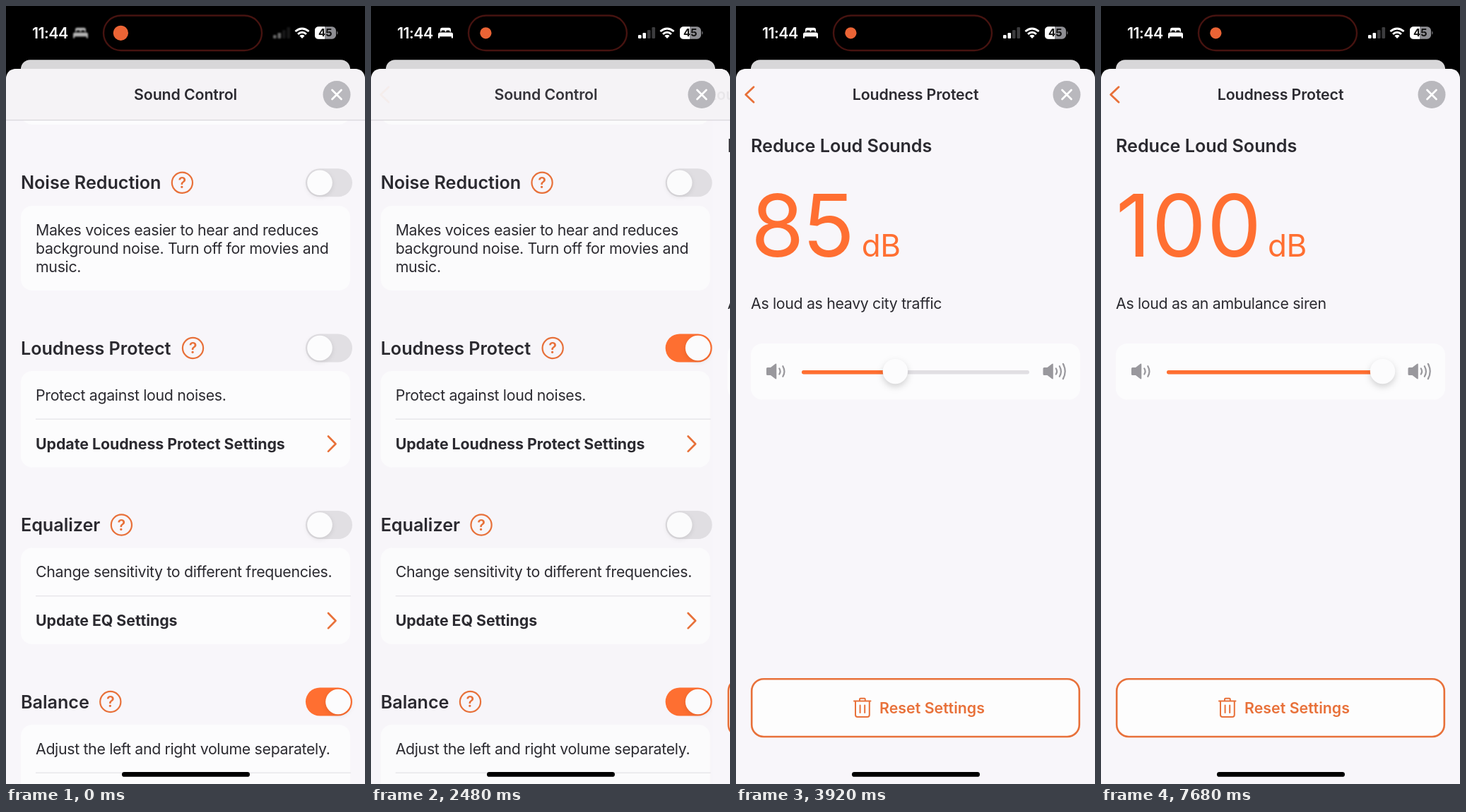
Write an HTML page that moves like this. It is 508 by 1102 pixels and loops after 7.76 s.

```html
<!DOCTYPE html>
<html lang="en">
<head>
<meta charset="utf-8">
<title>Sound Control</title>
<style>
  html, body { margin: 0; width: 100%; height: 100%; overflow: hidden; background: #000; }
  svg { display: block; width: 508px; height: 1102px; }
  text { font: 400 21.33px Inter, "Open Sans", sans-serif; letter-spacing: -.33px; fill: #2b2a30; white-space: pre; }
  .b { font-weight: 600; letter-spacing: -.12px; }
  .link { font-weight: 700; letter-spacing: -.05px; }
  .h { font-size: 25.2px; font-weight: 600; letter-spacing: -.05px; }
  .num { font-size: 122px; letter-spacing: 0; fill: #ff6f31; }
  .unit { font-size: 44px; letter-spacing: -.5px; fill: #ff6f31; }
  .time { font-weight: 600; letter-spacing: -.5px; fill: #fff; }
  .pct { font-size: 15px; font-weight: 700; letter-spacing: 0; fill: #111; }
  .q { font-size: 21.5px; font-weight: 600; letter-spacing: 0; fill: #e8713a; }
  .accent { fill: #e8713a; letter-spacing: .03px; }
  .mid { text-anchor: middle; }
  .line { fill: none; stroke: #e8713a; stroke-linecap: round; stroke-linejoin: round; }
  .card { fill: #fcfcfd; }
  .knob { fill: #fcfcfd; filter: drop-shadow(0 2px 3px rgba(0,0,0,.1)); }
  #thumb { filter: drop-shadow(0 4px 5px rgba(0,0,0,.17)); }
</style>
</head>
<body>
<svg id="stage" viewBox="0 0 508 1102"></svg>
<script>
const ORANGE = '#ff6f31', PAGE = '#f8f6fa';
const LOOP = 7760, STEP = 80, W = 508;

const rect = (x, y, w, h, r, attrs = '') =>
  `<rect x="${x}" y="${y}" width="${w}" height="${h}" rx="${r}" ${attrs}/>`;
const text = (x, y, s, cls = '', attrs = '') =>
  `<text x="${x}" y="${y}" class="${cls}" ${attrs}>${s}</text>`;
const path = (d, attrs) => `<path d="${d}" ${attrs}/>`;
const group = (id, body) => `<g id="${id}">${body}</g>`;

const toggle = (y, id, on) =>
  rect(424, y - 20, 66, 40, 20, `id="${id}Track" fill="${on ? ORANGE : '#e1dfe3'}"`) +
  `<circle id="${id}Knob" class="knob" cx="${on ? 470 : 444}" cy="${y}" r="17.8"/>`;

const section = (y, title, iconX, id, on) =>
  text(21, y + 9, title, 'h') +
  `<circle class="line" cx="${iconX}" cy="${y}" r="14.6" stroke-width="2.2"/>` +
  text(iconX, y + 7.6, '?', 'q mid') + toggle(y, id, on);

const divider = y => rect(42, y, 446, 1.3, 0, 'fill="#e6e5e9"');

const linkCard = (y, info, link) =>
  rect(21, y, 466, 136.5, 16, 'class="card"') + text(42, y + 41.5, info) + divider(y + 67.5) +
  (link ? text(42, y + 110.5, link, 'link') +
    path(`M456 ${y + 92.5}l10.5 10.7l-10.5 10.7`, 'class="line" stroke-width="2.7"') : '');

const speaker = (x, waves) => {
  let s = path(`M${x} 513.5q0-1.5 1.5-1.5h4.5l6.5-5q1.8-1.2 1.8 .8v19.4q0 2-1.8 .8l-6.5-5h-4.5q-1.5 0-1.5-1.5z`, 'fill="#99989d"');
  for (let i = 0; i < waves; i++) {
    const h = 4 + i * 3.3;
    s += path(`M${x + 18.3 + i * 5} ${517.5 - h}q${2.6 + i * 1.6} ${h} 0 ${2 * h}`,
      'fill="none" stroke="#99989d" stroke-width="2.2" stroke-linecap="round"');
  }
  return s;
};

const bars = [5, 8, 12, 16].map((h, i) =>
  rect(378 + i * 6.5, 46 - h, 4.6, h, 1.3, `fill="${i < 2 ? '#fff' : '#3c3c3e'}"`)).join('');

const wifi = [[9.6, 36], [6, 39.8]].map(([w, y]) =>
  path(`M${419 - w} ${y}q${w} ${-w * .82} ${2 * w} 0`, 'fill="none" stroke="#fff" stroke-width="2.9"')).join('') +
  path('M419 46l-3.6-3.8q3.6-2.8 7.2 0z', 'fill="#fff"');

const bed = path('M98 36.5v-3q0-2.8 2.8-2.8h9.4q2.8 0 2.8 2.8v3h-1.6v-1q0-1-1-1h-3q-1 0-1 1v1h-1.8v-1q0-1-1-1h-3q-1 0-1 1v1z' +
  'M97.5 37.5h16q2.5 0 2.5 2.5v5.4h-2.2v-2.2h-16.6v2.2h-2.2v-5.4q0-2.5 2.5-2.5z', 'fill="#fff"');

const status =
  text(37, 45.7, '11:44', 'time') + group('bed', bed) + group('bars', bars) + wifi +
  rect(138, 13.5, 224, 49.5, 24.7, 'fill="#000" stroke="#461310" stroke-width="2.4"') +
  '<circle id="dot" cx="162.4" cy="38.3" fill="#eb6435"/>' +
  rect(437, 29.3, 30, 17.4, 5.5, 'fill="#8e8e93"') +
  path('M451 29.3h-8.5q-5.5 0-5.5 5.5v6.4q0 5.5 5.5 5.5h8.5z', 'fill="#fff"') +
  path('M468.3 35.2q2.4 2.8 0 5.6z', 'fill="#8e8e93"') + text(451.8, 43.4, '45', 'pct mid');

const list =
  rect(21, 120, 466, 48, 16, 'class="card"') +
  section(250.3, 'Noise Reduction', 249.4, 'noise') +
  rect(21, 283, 466, 120, 16, 'class="card"') +
  ['Makes voices easier to hear and reduces', 'background noise. Turn off for movies and', 'music.']
    .map((s, i) => text(42, 325 + i * 26.2, s)).join('') +
  section(484.5, 'Loudness Protect', 264.5, 'loud') +
  linkCard(517, 'Protect against loud noises.', 'Update Loudness Protect Settings') +
  section(735, 'Equalizer', 163.4, 'eq') +
  linkCard(767.5, 'Change sensitivity to different frequencies.', 'Update EQ Settings') +
  section(985.5, 'Balance', 147.8, 'bal', true) +
  linkCard(1018, 'Adjust the left and right volume separately.');

const trash = path('M167 984.5h23.5M175 984v-2q0-1.3 1.3-1.3h5.2q1.3 0 1.3 1.3v2' +
  'M169 985v19q0 3 3 3h13.8q3 0 3-3v-19M175.6 990.5v10.5M182.2 990.5v10.5', 'class="line" stroke-width="2"');

const detail =
  rect(0, 89, W, 1013, 0, `fill="${PAGE}"`) +
  text(21, 207, 'Reduce Loud Sounds', 'h') +
  text(21, 355, '', 'num', 'id="num"') + text(0, 355, 'dB', 'unit', 'id="unit"') +
  text(21, 429, '', '', 'id="note"') +
  rect(21, 478, 466, 79.5, 16, 'class="card"') + speaker(43, 2) + speaker(434.5, 3) +
  rect(93, 516.1, 322, 5.4, 2.7, 'fill="#e1dfe3"') +
  rect(93, 516.1, 0, 5.4, 2.7, `id="fill" fill="${ORANGE}"`) +
  '<circle id="thumb" class="knob" cy="517.6" r="17.7"/>' +
  rect(22.2, 953.2, 463.6, 81.8, 17, 'fill="#fdfdfd" stroke="#e8713a" stroke-width="2.6"') +
  trash + text(203, 1002.4, 'Reset Settings', 'b accent');

const $ = id => document.getElementById(id);
const set = (id, attrs) => { for (const k in attrs) $(id).setAttribute(k, attrs[k]); };

$('stage').innerHTML =
  `<clipPath id="sheet"><path d="M0 1102V105q0-16 16-16H492q16 0 16 16V1102z"/></clipPath>` +
  rect(0, 0, W, 1102, 0, 'fill="#000"') + status +
  rect(21, 76.2, 466, 60, 13, 'fill="#d8d7d9"') +
  `<g clip-path="url(#sheet)">` +
    rect(0, 89, W, 1013, 0, `fill="${PAGE}"`) + group('list', list) +
    rect(0, 89, W, 1013, 0, 'id="shade"') + group('detail', detail) +
    group('bar', rect(0, 89, W, 72.5, 0, 'fill="#f5f3f6"') + rect(0, 161, W, 1.3, 0, 'fill="#d9d8dc"')) +
    text(254, 133.2, 'Sound Control', 'b mid', 'id="oldTitle"') +
    text(254, 133.2, 'Loudness Protect', 'b mid', 'id="newTitle"') +
    path('M25 114.7l-11.3 10.8l11.3 10.8', 'id="back" class="line" stroke-width="2.8"') +
    '<circle cx="468" cy="125.5" r="19.5" fill="#b9b8bd"/>' +
    path('M461.5 119l13 13m0-13l-13 13', 'stroke="#fff" stroke-width="2.7" stroke-linecap="round"') +
  '</g>' + rect(164, 1085, 181, 6.8, 3.4, 'fill="#000"');

// start time, level, dB label x, caption
const levels = [
  [0, 80, 179.5, 'a noisy restaurant'],
  [3920, 85, 177.7, 'heavy city traffic'],
  [4560, 90, 179.5, 'a motorcycle'],
  [5120, 95, 177.7, 'a car horn'],
  [5760, 100, 236, 'an ambulance siren']
];

// critically damped spring from 0 to 1
const spring = ms => {
  const x = Math.max(0, ms) * .0183;
  return 1 - (1 + x) * Math.exp(-x);
};
const mix = (a, b, k) => a + (b - a) * k;
const clamp = v => Math.min(1, Math.max(0, v));

function draw(t) {
  const intro = clamp(t / 320);
  set('dot', { r: mix(10.6, 8.1, intro) });
  for (const [id, dim] of [['bed', .7], ['bars', .4]]) {
    $(id).style.opacity = mix(dim, 1, intro);
    $(id).style.filter = intro < 1 ? `blur(${1.3 * (1 - intro)}px)` : 'none';
  }

  const on = spring(t - 860);
  const shades = [[225, 255], [223, 111], [227, 49]].map(([a, b]) => Math.round(mix(a, b, on)));
  set('loudTrack', { fill: `rgb(${shades})` });
  set('loudKnob', { cx: mix(444, 470, on) });

  const push = spring(t - 2461), x = W * (1 - push);
  const shift = v => `translate(${v} 0)`;
  set('list', { transform: shift(-.3 * W * push) });
  set('shade', { opacity: .1 * push });
  set('detail', { transform: shift(x) });
  set('bar', { transform: shift(Math.min(0, 1.17 * x - W)) });
  set('oldTitle', { transform: shift(-136 * push), opacity: clamp(1 - 1.07 * push) });
  set('newTitle', { transform: shift(.646 * x), opacity: clamp(1.2 * push) });
  set('back', { opacity: push });

  const [, level, unitX, caption] = levels.findLast(l => t >= l[0]);
  const thumbX = 110 + (level - 75) * 11.54;
  $('num').textContent = level;
  $('num').style.letterSpacing = level < 100 ? '-1px' : '1.2px';
  set('unit', { x: unitX });
  $('note').textContent = 'As loud as ' + caption;
  set('fill', { width: thumbX - 93 });
  set('thumb', { cx: thumbX });
}

function tick() {
  const t = performance.now() % LOOP;
  draw(Math.floor(t / STEP) * STEP);
  requestAnimationFrame(tick);
}
tick();
</script>
</body>
</html>
```
